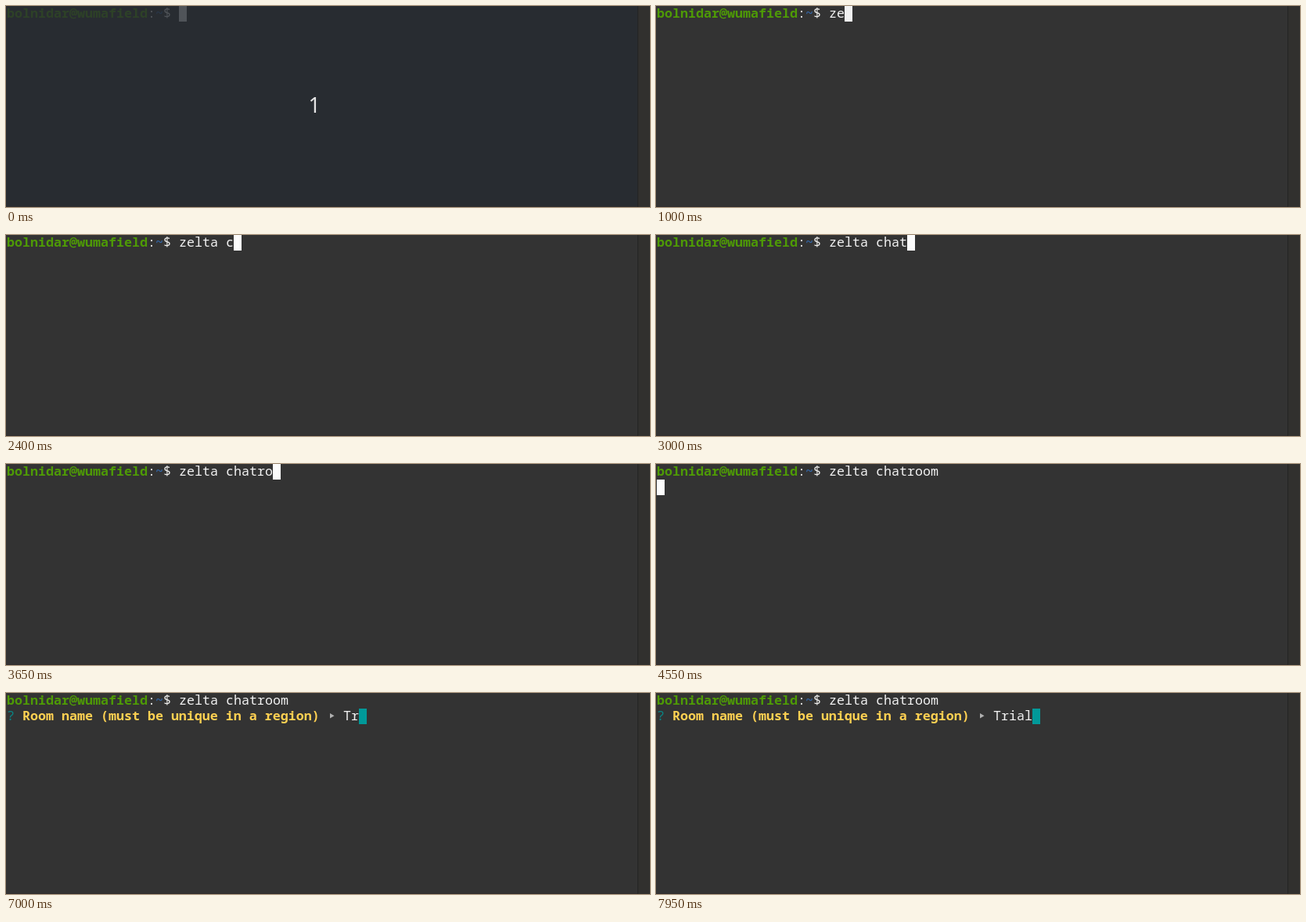
These frames come from a looping animation (823 px wide and 258 px high, 8 s). An HTML page with a canvas:

```html
<!DOCTYPE html>
<html lang="en">
<head>
<meta charset="utf-8">
<title>Terminal</title>
<style>
html, body { margin: 0; width: 100%; height: 100%; overflow: hidden; background: #333; }
canvas { display: block; }
</style>
</head>
<body>
<canvas id="stage" width="823" height="258"></canvas>
<script>
const ctx = document.getElementById('stage').getContext('2d');
const LOOP = 8000;
const CELL = 10, ROW = 20, LEFT = 1, BASE = 15;
const MONO = '16.667px "Noto Sans Mono", "DejaVu Sans Mono", monospace';

const USER = 'bolnidar@wumafield';
const COMMAND = 'zelta chatroom';
const QUESTION = 'Room name (must be unique in a region)';
const ANSWER = 'Trial';

// Time of each key press
const commandKeys = [500, 1000, 1500, 1700, 1900, 2000, 2400, 2500, 2750, 3000, 3500, 3650, 3900, 4000];
const answerKeys = [6500, 7000, 7300, 7500, 7950];
const COUNTDOWN_END = 300, ENTER = 4550, ASK = 4950;

const typed = (text, keys, t) => text.slice(0, keys.filter(k => k <= t).length);

function rect(color, x, y, w, h) {
  ctx.fillStyle = color;
  ctx.fillRect(x, y, w, h);
}

function write(text, col, row, color, weight = 400) {
  ctx.font = weight + ' ' + MONO;
  ctx.fillStyle = color;
  ctx.fillText(text, LEFT + col * CELL, row * ROW + BASE);
}

function cursor(col, row, color) {
  rect(color, LEFT + col * CELL, row * ROW, CELL, ROW);
}

function drawWindow() {
  rect('#333333', 0, 0, 823, 258);
  rect('#31302e', 808, 0, 15, 258);
  rect('#242424', 807, 0, 1, 258);
  rect('#302d2d', 0, 257, 807, 1);
}

function drawCommand(t) {
  write(USER, 0, 0, '#4e9a06', 700);
  write(':', 18, 0, '#eeeeec');
  write('~', 19, 0, '#3465a4', 700);
  write('$', 20, 0, '#eeeeec');
  const text = typed(COMMAND, commandKeys, t);
  write(text, 22, 0, '#f2f2f2');
  if (t < ENTER) {
    const shade = t < 1150 ? '#f2f2f2' : t < 1200 ? '#f7f7f7' : '#fcfcfc';
    cursor(22 + text.length, 0, shade);
  }
}

function drawQuestion(t) {
  write('?', 0, 1, '#0a8585');
  write(QUESTION, 2, 1, '#ffd152', 700);
  ctx.fillStyle = '#b0b0b0';
  ctx.beginPath();
  ctx.moveTo(414, 26);
  ctx.lineTo(419.5, 29.2);
  ctx.lineTo(414, 32.5);
  ctx.fill();
  const text = typed(ANSWER, answerKeys, t);
  write(text, 43, 1, '#f2f2f2');
  cursor(43 + text.length, 1, '#009999');
}

function drawCountdown() {
  rect('rgba(38, 42, 49, 0.79)', 0, 0, 807, 257);
  ctx.font = '27px "Noto Sans", "Open Sans", sans-serif';
  ctx.fillStyle = '#e4e4e4';
  ctx.fillText('1', 386.5, 137);
}

function draw(t) {
  drawWindow();
  drawCommand(t);
  if (t >= ASK) drawQuestion(t);
  else if (t >= ENTER) cursor(0, 1, '#fcfcfc');
  if (t < COUNTDOWN_END) drawCountdown();
}

const start = performance.now();
function tick() {
  draw((performance.now() - start) % LOOP);
  requestAnimationFrame(tick);
}
tick();
</script>
</body>
</html>
```
